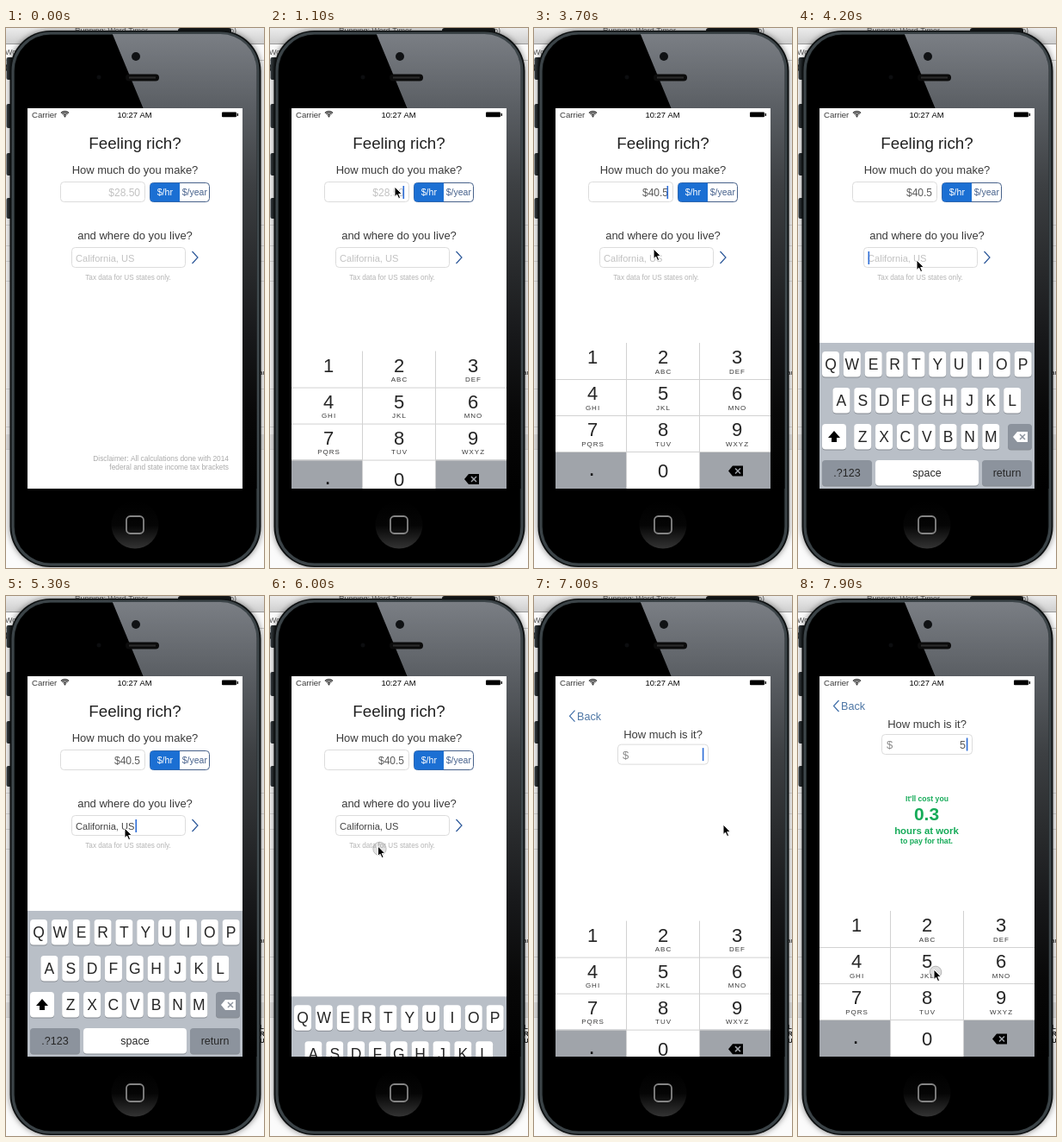
An HTML page with a canvas that plays this animation: 300x626 px, repeating every 8 s.

```html
<!DOCTYPE html>
<html lang="en">
<head>
<meta charset="utf-8">
<title>Feeling rich?</title>
<style>
html, body { margin: 0; width: 100%; height: 100%; overflow: hidden; background: #fff; }
canvas { display: block; width: 300px; height: 626px; }
</style>
</head>
<body>
<canvas id="stage"></canvas>
<script>
const LOOP = 8000, W = 300, H = 626;
const canvas = document.getElementById('stage');
const c = canvas.getContext('2d');
const dpr = window.devicePixelRatio || 1;
canvas.width = W * dpr;
canvas.height = H * dpr;

const FONT = '"Liberation Sans", Arial, sans-serif';
const BLUE = '#1b6fd3', GREEN = '#16ab59', INK = '#3a3a3a', DIGIT = '#262626', HINT = '#c2c2c2';
const SCREEN = { x: 25, y: 93, w: 250, h: 441 };

// ---- helpers ----
function text(s, x, y, size, color, align = 'left', weight = 400, gap = 0) {
  c.font = `${weight} ${size}px ${FONT}`;
  c.letterSpacing = gap + 'px';
  c.textAlign = align;
  c.fillStyle = color;
  c.fillText(s, x, y);
  c.letterSpacing = '0px';
}
function rect(x, y, w, h, color) {
  c.fillStyle = color;
  c.fillRect(x, y, w, h);
}
function round(x, y, w, h, r, fill, stroke, line = 1) {
  c.beginPath();
  c.roundRect(x, y, w, h, r);
  if (fill) { c.fillStyle = fill; c.fill(); }
  if (stroke) { c.strokeStyle = stroke; c.lineWidth = line; c.stroke(); }
}
function disc(x, y, r, fill) {
  c.beginPath();
  c.arc(x, y, r, 0, 7);
  c.fillStyle = fill;
  c.fill();
}
function path(points, stroke, line, fill) {
  c.beginPath();
  points.forEach(([x, y], i) => i ? c.lineTo(x, y) : c.moveTo(x, y));
  if (fill) { c.closePath(); c.fillStyle = fill; c.fill(); }
  if (stroke) { c.strokeStyle = stroke; c.lineWidth = line; c.stroke(); }
}
function blend(x0, y0, x1, y1, ...colors) {
  const g = c.createLinearGradient(x0, y0, x1, y1);
  colors.forEach((k, i) => g.addColorStop(i / (colors.length - 1), k));
  return g;
}
const clamp = v => Math.max(0, Math.min(1, v));
const smooth = v => { v = clamp(v); return v * v * (3 - 2 * v); };
// Share of the way still to go, critically damped
function rest(t, start) {
  const k = Math.max(0, t - start) * 0.0183;
  return (1 + k) * Math.exp(-k);
}

// ---- desktop and phone ----
function desktop(t) {
  rect(0, 0, W, H, '#fbfbfb');
  rect(0, 0, W, 18, blend(0, 0, 0, 18, '#ececec', '#cfcfcf'));
  rect(0, 18, W, 1, '#9a9a9a');
  text('Running: Word Timer', 80, 6, 9, '#555');
  text('(Show on web)', 268, 6, 9, '#555', 'right');
  rect(0, 37, W, 1, '#c8c8c8');
  text('Wo', -1, 31, 9, '#555');
  text('c', -2, 50, 15, '#111', 'left', 700);
  for (const y of [228, 252, 270, 293, 418, 462, 488]) rect(0, y, W, 1, '#dcdcdc');
  rect(0, 471, W, 17, '#e8e8e8');
  text('au', 294, 402, 8, '#222');
  if (t >= 4600) ['L', 'R', 'U'].forEach((s, i) => text(s, 295, 502 + i * 8, 8, '#111', 'left', 700));
}

function phone() {
  round(200, 0, 62, 9, 3, '#16191a');
  for (const [y, h] of [[34, 26], [88, 28], [145, 26], [197, 24]])
    round(0.5, y, 8, h, 2, blend(0, 0, 8, 0, '#3c4448', '#0c0e0f'));
  c.save();
  c.shadowColor = 'rgba(0,0,0,.5)';
  c.shadowBlur = 7 * dpr;
  round(4.5, 3, 292, 622, 47, '#0d1011');
  c.restore();
  round(8, 6, 285, 616, 44, null, blend(0, 0, 0, H, '#3b4347', '#3f494d', '#3b4347'), 3);
  round(10.5, 8, 280, 612, 41, '#000');

  c.save();
  c.beginPath();
  c.roundRect(9.5, 7, 282, 614, 42);
  c.clip();
  path([[123, 5], [159.5, 93], [275, 93], [275, 534], [292, 534], [292, 5]], null, 0,
    blend(0, 5, 0, 534, '#7b7f85', '#5a5e63', '#3d4043', '#2a2c2e', '#17181a', '#080808', '#000'));
  c.restore();

  disc(151, 33, 5, '#101214');
  disc(108, 57, 2.5, '#0c0d0f');
  round(139, 53.5, 39, 8, 4, '#0b0b0b');
  rect(143, 56.5, 31, 2, '#2c2c2c');

  disc(150, 576, 27.5, blend(0, 549, 0, 604, '#000', '#050505', '#343434'));
  round(140, 566, 20, 20, 4.5, null, '#858585', 1.8);
}

function statusBar() {
  text('Carrier', 30, 103.5, 9.6, INK);
  c.strokeStyle = '#222';
  c.lineWidth = 1.2;
  for (const r of [2.4, 4.4, 6.4]) {
    c.beginPath();
    c.arc(68.5, 103, r, -Math.PI * 0.75, -Math.PI * 0.25);
    c.stroke();
  }
  disc(68.5, 102.4, 1, '#222');
  text('10:27 AM', 149.5, 103.5, 9.4, '#000', 'center');
  round(251, 97.5, 17, 5.8, 1, '#000');
  rect(268.7, 99, 1.3, 3, '#000');
}

// ---- keyboards ----
function eraseIcon(x, y, fill, mark) {
  path([[x - 9, y], [x - 4, y - 6], [x + 8, y - 6], [x + 8, y + 6], [x - 4, y + 6]], null, 0, fill);
  path([[x - 1, y - 3], [x + 5, y + 3]], mark, 1.5);
  path([[x + 5, y - 3], [x - 1, y + 3]], mark, 1.5);
}

function numberPad(dy) {
  c.save();
  c.translate(0, dy);
  rect(25, 365, 250, 169, '#fff');
  rect(25, 491, 82.5, 43, '#a0a4aa');
  rect(192.5, 491, 82.5, 43, '#a0a4aa');
  for (const y of [407, 449, 491]) rect(25, y, 250, 1, '#d2d2d2');
  for (const x of [107, 192]) rect(x, 365, 1, 169, '#d2d2d2');
  const groups = ['', 'ABC', 'DEF', 'GHI', 'JKL', 'MNO', 'PQRS', 'TUV', 'WXYZ'];
  const mid = [68, 150, 236];
  groups.forEach((g, i) => {
    const x = mid[i % 3], y = 365 + 42 * Math.floor(i / 3);
    text(String(i + 1), x, y + 24, 22, DIGIT, 'center');
    text(g, x + 0.5, y + 35.5, 8, INK, 'center', 400, 1);
  });
  text('0', 150, 521, 22, DIGIT, 'center');
  text('.', 67, 519, 26, '#111', 'center');
  eraseIcon(235, 513.5, '#000', '#a0a4aa');
  c.restore();
}

function key(x, y, w, label, dark, size = 17.5) {
  round(x, y + 1, w, 29.5, 4, '#868b92');
  round(x, y, w, 29.5, 4, dark ? '#8c939d' : '#fff');
  if (label) text(label, x + w / 2, y + (size > 15 ? 21 : 18.5), size, DIGIT, 'center');
}

function letterPad(dy) {
  c.save();
  c.translate(0, dy);
  rect(25, 365, 250, 169, '#b9bfc7');
  [['QWERTYUIOP', 38, 375], ['ASDFGHJKL', 50.4, 417], ['ZXCVBNM', 75.2, 459]].forEach(([row, x, y]) =>
    [...row].forEach((s, i) => key(x + 24.85 * i - 10, y, 20, s)));
  key(28, 459, 28, '');
  path([[42, 467], [49, 475], [45, 475], [45, 480], [39, 480], [39, 475], [35, 475]], null, 0, '#000');
  key(244, 459, 28, '', true);
  eraseIcon(259, 474, '#fff', '#8c939d');
  key(28, 501, 58, '.?123', true, 12.5);
  key(90, 501, 120, 'space', false, 12.5);
  key(214, 501, 58, 'return', true, 12.5);
  c.restore();
}

// ---- form views ----
function field(x, y, w, h = 23) {
  round(x + 0.5, y + 0.5, w, h, 4, '#fff', '#dcdcdc');
}
function caret(x, y, age) {
  const p = age % 1000;
  c.globalAlpha = p < 650 ? clamp((650 - p) / 250) : clamp((p - 850) / 150);
  rect(x, y, 1.6, 15, '#2c6cd6');
  c.globalAlpha = 1;
}

const PLACE = 'California, US';
function typed(t) {
  if (t < 4600) return '';
  const step = Math.floor((t - 4600) / 100) + 1;
  return PLACE.slice(0, Math.ceil(step * PLACE.length / 8));
}
function amount(t) {
  if (t < 1700) return '';
  return t < 1900 ? '$4' : t < 2600 ? '$40' : t < 3000 ? '$40.' : '$40.5';
}

function incomeView(t) {
  text('Feeling rich?', 150, 140, 18.8, '#222', 'center');
  text('How much do you make?', 150, 169, 13, INK, 'center');
  field(63, 178, 98);
  const sum = amount(t);
  text(sum || '$28.50', 156, 194.5, 12, sum ? '#5a5a5a' : HINT, 'right');
  if (t >= 800 && t < 3900) caret(154.5, 183, t - (t < 1700 ? 800 : 1700));

  round(167.5, 179.5, 69, 22, 4, '#fff', '#47618a');
  round(167.5, 179.5, 34.5, 22, [4, 0, 0, 4], BLUE);
  text('$/hr', 184.8, 194, 10.6, '#fff', 'center');
  text('$/year', 219.3, 194, 10.5, '#46618c', 'center');

  text('and where do you live?', 150, 245, 13, INK, 'center');
  field(76, 254, 132);
  const place = typed(t);
  text(place || PLACE, 81, 270.5, 11.1, place ? '#444' : HINT);
  if (t >= 3900 && t < 5890) {
    const x = place ? 82 + c.measureText(place).width : 81.5;
    const age = t < 4600 ? t - 3900 : Math.max(0, t - 5300);
    caret(x, 259, age);
  }
  path([[216.5, 259], [223, 266], [216.5, 273]], '#2a5698', 1.2);
  text('Tax data for US states only.', 142, 291.5, 8.2, '#b4b4b4', 'center');
  text('Disclaimer: All calculations done with 2014', 259, 502, 8.35, '#aaa', 'right');
  text('federal and state income tax brackets', 259, 511.5, 8.35, '#aaa', 'right');

  if (t >= 800 && t < 3900) numberPad(169 * rest(t, 850));
  if (t >= 3900 && t < 6400) letterPad(t < 5893 ? 0 : 169 * (1 - rest(t, 5893)));
}

function priceView(t) {
  c.save();
  c.translate(0, 441 * rest(t, 6700));
  rect(25, 93, 250, 441, '#fff');
  path([[47.5, 121], [41.5, 127.5], [47.5, 134]], '#3f6ea8', 1.2);
  text('Back', 50, 132, 12.6, '#4d76a5');
  text('How much is it?', 150, 153, 13, INK, 'center');
  field(97, 160, 105);
  text('$', 103, 177, 13, '#8a8a8a');
  const done = t >= 7800;
  if (done) {
    text('5', 195, 176.5, 12.5, '#5a5a5a', 'right');
    text("It'll cost you", 150, 238, 8.6, GREEN, 'center', 700);
    text('0.3', 149.5, 260, 21, GREEN, 'center', 700);
    text('hours at work', 149.5, 276, 11.4, GREEN, 'center', 700);
    text('to pay for that.', 149.5, 287, 8.8, GREEN, 'center', 700);
  }
  caret(195.8, 164.5, done ? t - 7800 : t - 6750);
  numberPad(0);
  c.restore();
}

// ---- pointer ----
const STOPS = [
  [200, 300, 330], [700, 145, 184], [3400, 145, 184], [3800, 138, 269],
  [5600, 138, 269], [5820, 125.5, 290], [6150, 125.5, 290], [6500, 220, 265],
  [7350, 220, 265], [7700, 158, 433], [LOOP, 158, 433]
];
const CLICKS = [760, 3850, 5850, 6620, 7780];

function pointer(t) {
  if (t < 200) return;
  const i = STOPS.findIndex(s => t < s[0]);
  const [t0, x0, y0] = STOPS[i - 1], [t1, x1, y1] = STOPS[i];
  const k = smooth((t - t0) / (t1 - t0));
  const x = x0 + (x1 - x0) * k, y = y0 + (y1 - y0) * k;
  for (const at of CLICKS) {
    const age = t - at;
    if (age < 0 || age > 250) continue;
    c.globalAlpha = 1 - age / 280;
    c.beginPath();
    c.arc(x + 2, y + 3, 3.5 + age / 36, 0, 7);
    c.fillStyle = 'rgba(140,140,140,.5)';
    c.fill();
    c.strokeStyle = '#888';
    c.lineWidth = 1;
    c.stroke();
    c.globalAlpha = 1;
  }
  c.save();
  c.translate(x, y);
  path([[0, 0], [0, 11.5], [2.6, 9.2], [4.6, 13.6], [6.6, 12.7], [4.7, 8.5], [8.2, 8.2]], '#fff', 1, '#000');
  c.restore();
}

function draw(t) {
  c.setTransform(dpr, 0, 0, dpr, 0, 0);
  desktop(t);
  phone();
  c.save();
  c.beginPath();
  c.rect(SCREEN.x, SCREEN.y, SCREEN.w, SCREEN.h);
  c.clip();
  rect(SCREEN.x, SCREEN.y, SCREEN.w, SCREEN.h, '#fff');
  incomeView(t);
  if (t >= 6700) priceView(t);
  statusBar();
  c.restore();
  pointer(t);
}

const start = performance.now();
function tick() {
  draw((performance.now() - start) % LOOP);
  requestAnimationFrame(tick);
}
tick();
</script>
</body>
</html>
```
